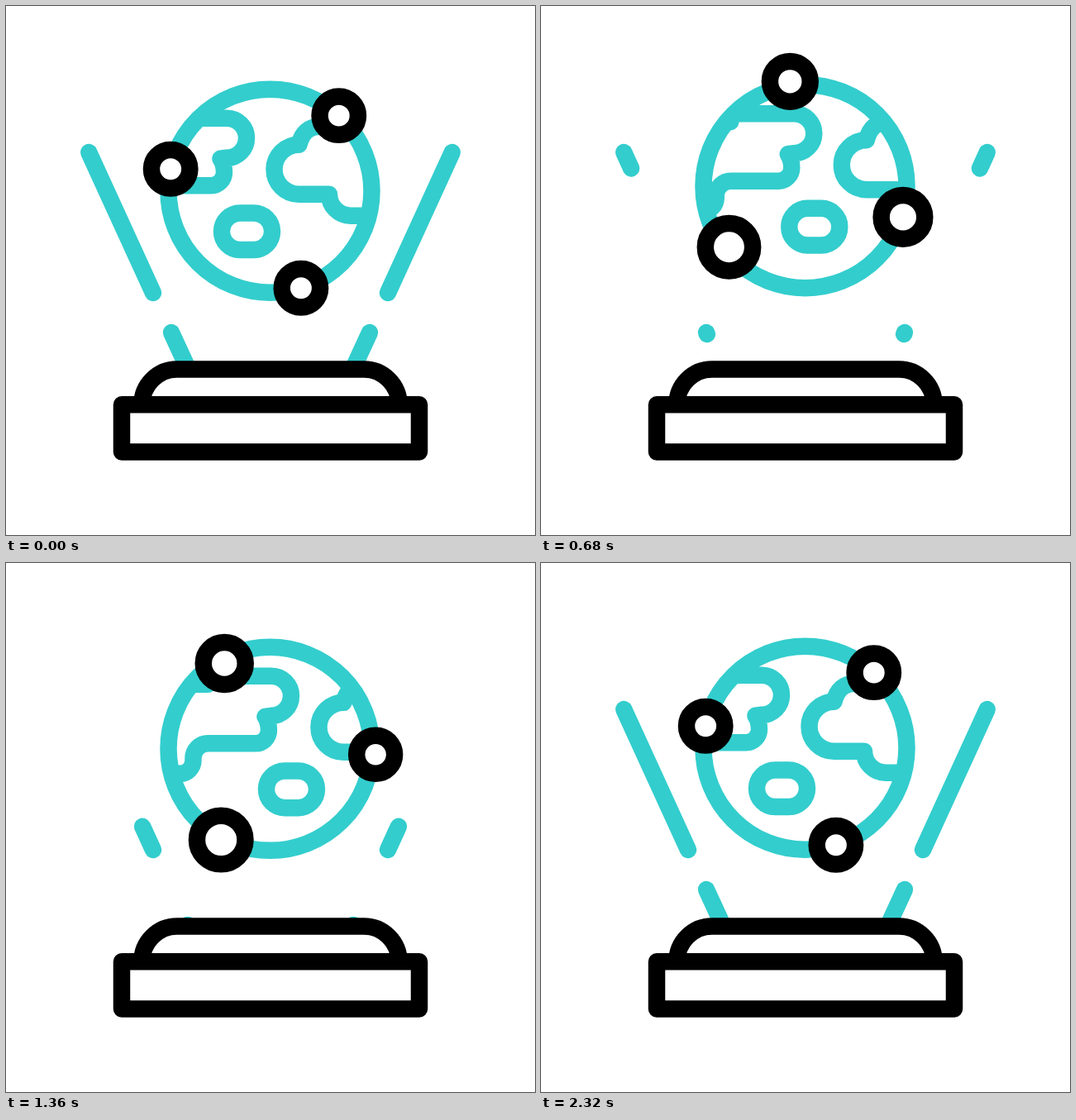
Animation, 640 px wide and 640 px high, one loop 2440 ms. Source, as an HTML page with a canvas:

```html
<!DOCTYPE html>
<html lang="en">
<head>
<meta charset="utf-8">
<title>Hologram globe</title>
<style>
  html, body { margin: 0; width: 100%; height: 100%; overflow: hidden; background: #fff; }
  canvas { display: block; width: 640px; height: 640px; }
</style>
</head>
<body>
<canvas id="stage" width="640" height="640"></canvas>
<script>
const ctx = document.getElementById('stage').getContext('2d');
const TEAL = '#33cdcd', BLACK = '#000', WHITE = '#fff';
const LOOP = 2440, STEP = 40, LAST = 2320;
const GLOBE_X = 319.5, GLOBE_R = 123, MAP_WIDTH = 284, STROKE = 20.5;
const DEG = Math.PI / 180;

const clamp01 = v => Math.min(1, Math.max(0, v));
const mix = (a, b, k) => a + (b - a) * k;

// Cubic bezier easing with flat ends: (x1, 0, x2, 1).
function ease(t, start, duration, x1, x2) {
  const x = clamp01((t - start) / duration);
  let lo = 0, hi = 1;
  for (let i = 0; i < 30; i++) {
    const u = (lo + hi) / 2, v = 1 - u;
    if (3 * v * v * u * x1 + 3 * v * u * u * x2 + u * u * u < x) lo = u; else hi = u;
  }
  return lo * lo * (3 - 2 * lo);
}

// Cosine-eased values, evenly spaced in time.
function swing(t, start, span, values) {
  const p = Math.min(values.length - 1, Math.max(0, (t - start) / span));
  const i = Math.min(values.length - 2, Math.floor(p));
  return mix(values[i], values[i + 1], (1 - Math.cos((p - i) * Math.PI)) / 2);
}

const continent = new Path2D();
continent.moveTo(380, -78);
continent.quadraticCurveTo(360, -78, 354.5, -56);
continent.arc(354.5, -26, 30, -Math.PI / 2, Math.PI / 2, true);
continent.lineTo(390, 4);
continent.arc(417, 4, 26, Math.PI, Math.PI / 2, true);
continent.arcTo(456.5, 30, 456.5, 14, 16);
continent.arcTo(456.5, -6.5, 474, -6.5, 18);
continent.arcTo(548, -6.5, 548, -24, 16);
continent.quadraticCurveTo(548, -32, 543.5, -39);
continent.lineTo(551, -40);
continent.arc(551, -64, 24, Math.PI / 2, -Math.PI / 2, true);
continent.lineTo(484, -88);
continent.quadraticCurveTo(475, -88, 474, -78);
continent.closePath();

const island = new Path2D();
island.roundRect(261, 26.7, 61, 44.6, 22.3);

const base = new Path2D();
base.rect(140, 482.2, 360, 57.4);
base.moveTo(164.5, 482);
base.arc(207, 482, 42.5, Math.PI, 1.5 * Math.PI);
base.arc(433, 482, 42.5, 1.5 * Math.PI, 2 * Math.PI);

const nodes = [
  { angle: 192.4, delay: -120, peak: 29.8 },
  { angle: 312.4, delay: 0, peak: 28 },
  { angle: 72.4, delay: 120, peak: 28.8 }
];

function drawBeam(x1, y1, x2, y2, from, to) {
  if (to <= from) return;
  for (const side of [-1, 1]) {
    const px = k => 320 + side * (320 - mix(x1, x2, k));
    ctx.beginPath();
    ctx.moveTo(px(from), mix(y1, y2, from));
    ctx.lineTo(px(to), mix(y1, y2, to));
    ctx.stroke();
  }
}

function drawBeams(t) {
  ctx.strokeStyle = TEAL;
  const upper = t < 1100
    ? [0, 1 - ease(t, 0, 1040, .325, .325)]
    : [1 - ease(t, 1160, 993, .32, .32), 1];
  const lower = t < 1100
    ? [0, 1 - ease(t, 0, 880, .32, .32)]
    : [1 - ease(t, 1318, 510, .32, .32), 1];
  if (t < 1040 || t > 1160) drawBeam(100.2, 177, 178, 347, ...upper);
  if (t < 880 || t > 1320) drawBeam(200, 395, 220.3, 439, ...lower);
}

function drawGlobe(t, cy) {
  const shift = -2 * MAP_WIDTH * ease(t, 136, 1845, .25, .296) % MAP_WIDTH;
  ctx.strokeStyle = TEAL;
  ctx.save();
  ctx.beginPath();
  ctx.arc(GLOBE_X, cy, GLOBE_R, 0, 2 * Math.PI);
  ctx.clip();
  ctx.translate(shift - MAP_WIDTH, cy);
  for (let i = 0; i < 3; i++) {
    ctx.stroke(continent);
    ctx.stroke(island);
    ctx.translate(MAP_WIDTH, 0);
  }
  ctx.restore();
  ctx.beginPath();
  ctx.arc(GLOBE_X, cy, GLOBE_R, 0, 2 * Math.PI);
  ctx.stroke();
}

function drawNodes(t, cy) {
  const turn = 360 * ease(t, 160, 1960, .406, .404) * DEG;
  ctx.strokeStyle = BLACK;
  ctx.fillStyle = WHITE;
  for (const { angle, delay, peak } of nodes) {
    // The ring of nodes turns about a point slightly right of the globe's centre.
    const x = 123.3 * Math.cos(angle * DEG) - 5.3;
    const y = 123.3 * Math.sin(angle * DEG) + .7;
    const radius = swing(t, Math.max(0, delay), 520 + Math.min(0, delay), [23.2, peak]);
    const pulse = t < 520 + delay ? radius : swing(t, 520 + delay, 520, [peak, 20.2, peak, 23.2]);
    ctx.beginPath();
    ctx.arc(
      GLOBE_X + 5.4 + x * Math.cos(turn) - y * Math.sin(turn),
      cy - .7 + x * Math.sin(turn) + y * Math.cos(turn),
      pulse, 0, 2 * Math.PI);
    ctx.fill();
    ctx.stroke();
  }
}

function draw(t) {
  ctx.fillStyle = WHITE;
  ctx.fillRect(0, 0, 640, 640);
  ctx.lineWidth = STROKE;
  ctx.lineCap = ctx.lineJoin = 'round';
  const cy = swing(t, 0, 560, [223.7, 216.7, 230, 216.7, 223.7]);
  drawBeams(t);
  drawGlobe(t, cy);
  drawNodes(t, cy);
  ctx.strokeStyle = BLACK;
  ctx.stroke(base);
}

const began = performance.now();
function tick() {
  const t = (performance.now() - began) % LOOP;
  draw(Math.min(LAST, Math.floor(t / STEP) * STEP));
  requestAnimationFrame(tick);
}
tick();
</script>
</body>
</html>
```
